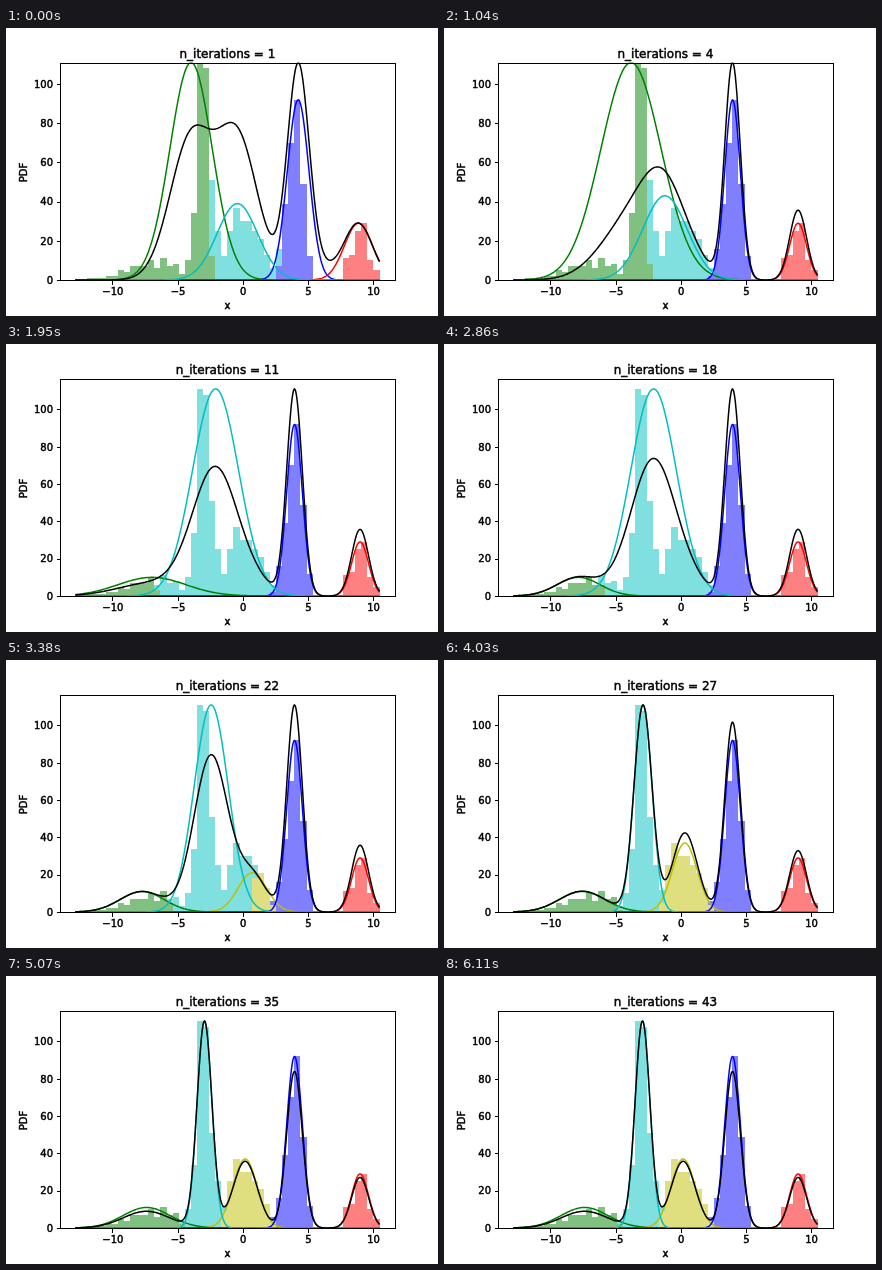
An HTML page that plays this animation: 432x288 px, repeating every 8000 ms.

```html
<!DOCTYPE html>
<html lang="en">
<head>
<meta charset="utf-8">
<title>Mixture fit</title>
<style>
html, body { margin: 0; width: 100%; height: 100%; overflow: hidden; background: #fff; }
svg { display: block; }
text { font: 10px "DejaVu Sans", Verdana, sans-serif; stroke: #000; stroke-width: .45px; }
#title { font-size: 12px; }
.line { fill: none; stroke-width: 1.5; stroke-linejoin: round; }
.axis { fill: none; stroke: #000; stroke-width: 1; shape-rendering: crispEdges; }
</style>
</head>
<body>
<svg width="432" height="288" viewBox="0 0 432 288">
  <clipPath id="area"><rect x="54" y="34.6" width="334.8" height="217.4"/></clipPath>
  <g clip-path="url(#area)">
    <g id="bars" shape-rendering="crispEdges"></g>
    <g id="lines"></g>
  </g>
  <rect class="axis" x="54.5" y="35.5" width="335" height="217"/>
  <g id="ticks"></g>
  <text id="title" x="221.4" y="30" text-anchor="middle"></text>
  <text x="221.5" y="280.5" text-anchor="middle">x</text>
  <text transform="translate(21.4 144.5) rotate(-90)" text-anchor="middle">PDF</text>
</svg>
<script>
const LOOP = 8000, HOLD = 780, STEP = 130, LAST = 43;
const BASE = 252, HEIGHT = 217.44, PEAK = 111;
const START = -12.89, BIN = 0.4671, BINS = 50;

const byId = id => document.getElementById(id);
const toX = v => 237.2 + 13.03 * v;
const bell = (v, mean, sigma) => Math.exp(-.5 * ((v - mean) / sigma) ** 2);

// A low rippled hill on the left, then the tall clusters.
const counts = Array.from({ length: BINS }, (_, i) =>
  Math.round(8.8 * bell(i, 13.5, 5) * (1 + .26 * Math.cos(2 * Math.PI * (i - 7) / 2.4))));
const setBins = (first, ...heights) => counts.splice(first, heights.length, ...heights);
counts.fill(0, 18);
setBins(17, 3, 10, 34, 111, 108, 51, 25, 12);
setBins(25, 25, 37, 30, 30, 25, 21, 13, 6);
setBins(33, 16, 39, 70, 92, 49, 12);
setBins(44, 11, 13, 25, 29, 10, 5);

// Iterations at which the fit reaches its key poses; missing poses repeat the last one.
const STAGES = [1, 4, 11, 18, 27, 33];

function along(n, ...poses) {
  const next = STAGES.findIndex(stage => stage > n);
  const i = next < 0 ? STAGES.length - 1 : next - 1;
  const pose = k => poses[Math.min(k, poses.length - 1)];
  const t = next < 0 ? 0 : (n - STAGES[i]) / (STAGES[next] - STAGES[i]);
  return pose(i) + (pose(i + 1) - pose(i)) * t * t * (3 - 2 * t);
}

// Masses are relative to the blue cluster.
function fit(n) {
  const greenEnd = along(n, -2.5, -2.54, -6.55, -6.1, -4.85, -4.65);
  const blueStart = along(n, 2.79, 2.35);
  const cyanEnd = Math.min(blueStart, along(n, 2.79, 2.35, 2.35, 2.35, -1.4, -1.58));
  return {
    green: {
      mean: along(n, -4, -3.85, -7, -7.88, -7.6, -7.42),
      sigma: along(n, 1.62, 2.3, 2.6, 1.65, 1.75, 1.8),
      mass: along(n, 1.33, 1.03, .27, .25, .32),
      range: [-99, greenEnd]
    },
    yellow: {
      mean: along(n, 5.5, 1.2, 1.2, 1, .28, .15),
      sigma: along(n, 1.6, 1.2, 1.2, 1.2, .95, .93),
      mass: along(n, .12, .05, .06, .06, .66),
      range: [cyanEnd, blueStart]
    },
    blue: { mean: along(n, 4.22, 3.94), sigma: along(n, .83, .6), mass: 1, range: [blueStart, 7] },
    red: { mean: along(n, 8.85, 8.97), sigma: along(n, 1.08, .65), mass: .35, range: [7, 99] },
    cyan: {
      mean: along(n, -.45, -1.25, -2.12, -2.12, -2.93, -2.97),
      sigma: along(n, 1.56, 1.7, 1.77, 1.75, .69, .57),
      mass: along(n, 1.28, 1.02, 1.82, 1.94, 1.25),
      range: [greenEnd, cyanEnd]
    }
  };
}

function add(parent, tag, attrs, text = '') {
  const node = document.createElementNS('http://www.w3.org/2000/svg', tag);
  for (const key in attrs) node.setAttribute(key, attrs[key]);
  node.textContent = text;
  return parent.appendChild(node);
}

// Part of every bin that lies inside the range.
function histogram([from, to]) {
  return counts.map((count, i) => {
    const left = START + i * BIN;
    const overlap = Math.min(to, left + BIN) - Math.max(from, left);
    return Math.round(count * Math.max(0, overlap) / BIN);
  });
}

const colors = {
  green: ['#008000', '#80c080'], yellow: ['#bfbf00', '#dfdf80'], blue: ['#0000ff', '#8080ff'],
  red: ['#ff0000', '#ff8080'], cyan: ['#00bfbf', '#80dfdf']
};
const shapes = {};
for (const name in colors) {
  const [stroke, fill] = colors[name];
  shapes[name] = {
    bars: add(byId('bars'), 'path', { fill }),
    curve: add(byId('lines'), 'path', { class: 'line', stroke })
  };
}
const mixture = add(byId('lines'), 'path', { class: 'line', stroke: '#000' });

for (let v = -10; v <= 10; v += 5) {
  const x = Math.round(toX(v) - .5) + .5;
  add(byId('ticks'), 'path', { class: 'axis', d: `M${x} 253v3.5` });
  add(byId('ticks'), 'text', { x: toX(v), y: 267, 'text-anchor': 'middle' }, String(v).replace('-', '\u2212'));
}
const yTicks = Array.from({ length: 6 }, (_, i) => ({
  value: i * 20,
  mark: add(byId('ticks'), 'path', { class: 'axis' }),
  label: add(byId('ticks'), 'text', { x: 47, 'text-anchor': 'end' }, i * 20)
}));

const positions = Array.from({ length: 401 }, (_, i) => START + BINS * BIN * i / 400);

function draw(n) {
  const model = fit(n);
  // The axis loses its headroom while green holds the tallest bin.
  const top = Math.max(...histogram(model.green.range)) === PEAK ? PEAK : PEAK * 1.05;
  const toY = v => BASE - v * HEIGHT / top;
  const trace = f => 'M' + positions.map(v => `${toX(v).toFixed(2)} ${toY(f(v)).toFixed(2)}`).join('L');

  const stack = counts.map(() => 0);
  for (const name in model) {
    const { mean, sigma, range } = model[name];
    const part = histogram(range);
    let d = '';
    part.forEach((count, i) => {
      if (!count) return;
      const x = toX(START + i * BIN), y = toY(stack[i]);
      stack[i] += count;
      d += `M${x} ${y}V${toY(stack[i])}H${toX(START + (i + 1) * BIN)}V${y}Z`;
    });
    shapes[name].bars.setAttribute('d', d);
    const peak = Math.max(...part);
    shapes[name].curve.setAttribute('d', peak ? trace(v => peak * bell(v, mean, sigma)) : '');
  }

  const density = v => Object.values(model).reduce((sum, c) => sum + c.mass / c.sigma * bell(v, c.mean, c.sigma), 0);
  const scale = PEAK / Math.max(...positions.map(density));
  mixture.setAttribute('d', trace(v => density(v) * scale));

  for (const { value, mark, label } of yTicks) {
    mark.setAttribute('d', `M54 ${Math.round(toY(value)) + .5}h-3.5`);
    label.setAttribute('y', toY(value) + 3.8);
  }
  byId('title').textContent = `n_iterations = ${n}`;
}

let shown = 0;
function tick() {
  const t = performance.now() % LOOP;
  const n = t < HOLD ? 1 : Math.min(LAST, 2 + Math.floor((t - HOLD) / STEP));
  if (n !== shown) draw(shown = n);
  requestAnimationFrame(tick);
}
tick();
</script>
</body>
</html>
```
